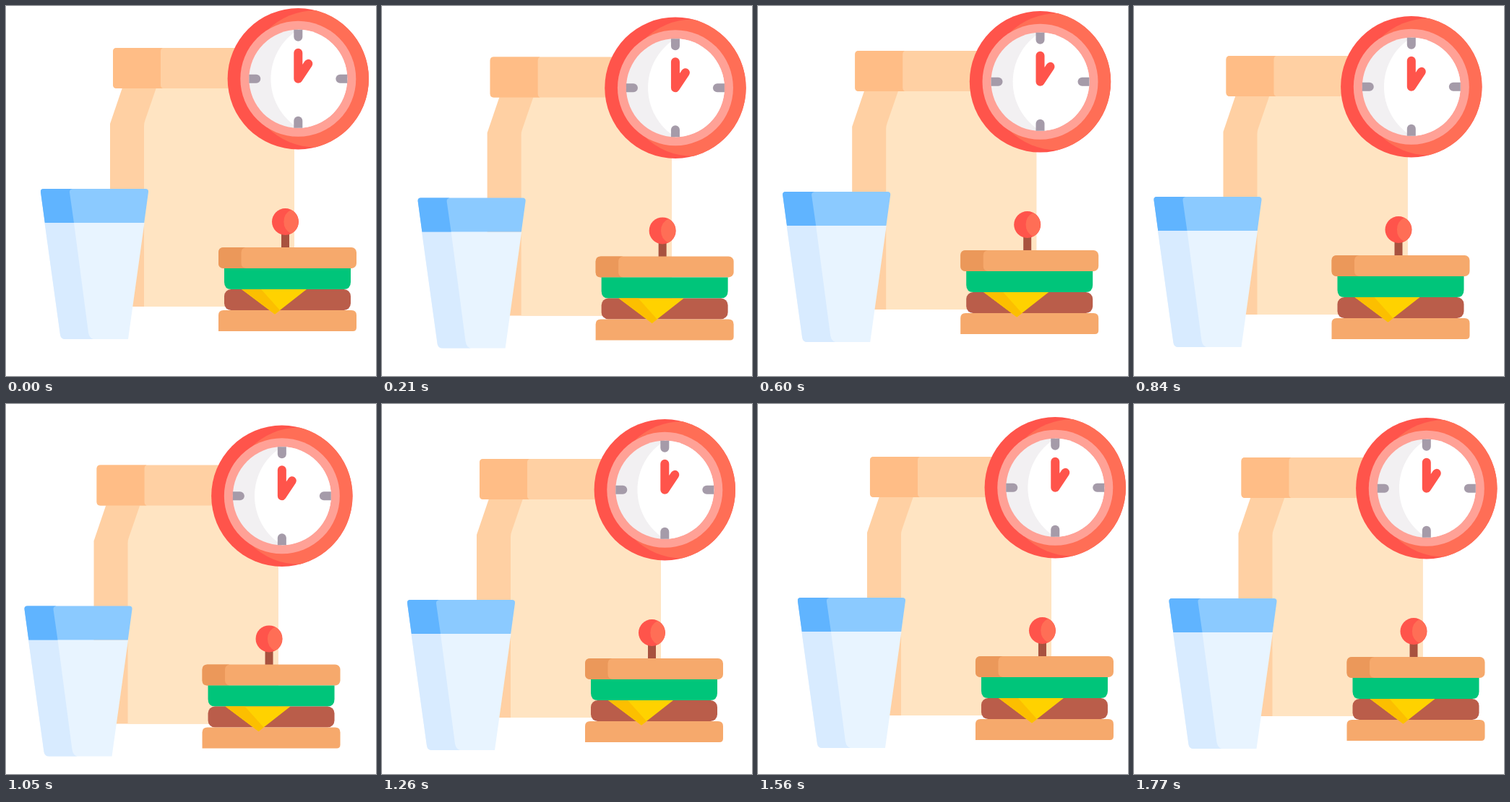
An HTML page that plays this animation: 512x512 px, repeating every 1.8 s.

```html
<!DOCTYPE html>
<html lang="en">
<head>
<meta charset="utf-8">
<title>Lunch time</title>
<style>
  html, body { margin: 0; width: 100%; height: 100%; overflow: hidden; background: #fff; }
  svg { display: block; width: 100%; height: 100%; }
</style>
</head>
<body>
<svg viewBox="0 0 512 512">
  <defs><path id="tick" d="M-6-68H6v10a6 6 0 0 1-12 0z" fill="#a59ba9"/></defs>
  <g id="scene">
    <!-- paper bag -->
    <path d="M161 113H380L399 163V416H144V163z" fill="#ffd0a3"/>
    <path d="M208 113H380L399 163V416H191V166Q191 162 192.500 158z" fill="#ffe4c2"/>
    <rect x="148" y="58" width="240" height="56" rx="5" fill="#ffd0a3"/>
    <path d="M153 58H217Q214 59 214 63V109Q214 113 217 114H153Q148 114 148 109V63Q148 58 153 58z" fill="#ffbd86"/>

    <!-- glass -->
    <path d="M53.500 300H191.500L169 461H82Q76 461 75 455z" fill="#e8f4ff"/>
    <path d="M53.500 300H94L114 452Q115.500 460 121 461H82Q76 461 75 455z" fill="#d8ebff"/>
    <path d="M52 253H193Q197.500 253 197 257.500L191.200 300H53.800L48 257.500Q47.500 253 52 253z" fill="#8bcaff"/>
    <path d="M52 253H92Q87.500 254 88 258L94 300H53.800L48 257.500Q47.500 253 52 253z" fill="#60b4ff"/>

    <!-- sandwich -->
    <rect x="381" y="312" width="11" height="24" fill="#a8523f"/>
    <circle cx="386.500" cy="298.500" r="18.500" fill="#ff544b"/>
    <path d="M394.500 282A18.500 18.500 0 0 1 394.500 315A18.500 18.500 0 0 1 394.500 282z" fill="#ff6e56"/>
    <rect x="294" y="334" width="191" height="29" rx="7" fill="#f6a96c"/>
    <path d="M301 334H332Q325.500 335 325.500 341V356Q325.500 362 332 363H301Q294 363 294 356V341Q294 334 301 334z" fill="#eb985a"/>
    <path d="M302 363H477V382Q477 392 467 392H312Q302 392 302 382z" fill="#00c57a"/>
    <rect x="302" y="392" width="175" height="29" rx="9.500" fill="#ba5d4a"/>
    <path d="M301 421H478Q485 421 485 428V445Q485 450 480 450H294V428Q294 421 301 421z" fill="#f6a96c"/>
    <path d="M326 392H416L372 426.500z" fill="#ffd200"/>
    <path d="M326 392H353L379 421L372 426.500z" fill="#fcbf00"/>

    <!-- clock -->
    <g transform="translate(404.300 100.800)">
      <circle r="97.700" fill="#ff544b"/>
      <path d="M24-94.700A97.700 97.700 0 0 1 24 94.700A94.700 94.700 0 0 1 24-94.700z" fill="#ff6e56"/>
      <circle r="80" fill="#ffa196"/>
      <circle r="68" fill="#f2f0f2"/>
      <path d="M0-68A68 68 0 0 1 0 68A80 80 0 0 1 0-68z" fill="#fff"/>
      <use href="#tick"/>
      <use href="#tick" transform="rotate(90)"/>
      <use href="#tick" transform="rotate(180)"/>
      <use href="#tick" transform="rotate(270)"/>
      <path d="M0-36V0L14-21" fill="none" stroke="#ff544b" stroke-width="12" stroke-linecap="round" stroke-linejoin="round"/>
    </g>
  </g>
</svg>
<script>
const LOOP = 1800, STEP = 30;

// Drift of the whole scene: [time in ms, offset]
const driftX = [[0, 0], [120, 4], [390, -7.5], [540, -11.2], [600, -13.8], [840, -20.5],
  [980, -23], [1080, -22], [1260, -13], [1570, 7], [1620, 6], [1770, 0.5]];
const driftY = [[0, 0], [310, 15], [390, 13.5], [590, 4], [840, 11], [1080, 27],
  [1260, 18], [1420, 12], [1560, 15], [1660, 18], [1770, 16]];

// Monotone cubic curve: it turns only at the given peaks
function curve(keys) {
  const slope = i => (keys[i + 1][1] - keys[i][1]) / (keys[i + 1][0] - keys[i][0]);
  const last = keys.length - 1;
  const tangent = i => {
    if (i === 0) return slope(0);
    if (i === last) return slope(last - 1);
    const a = slope(i - 1), b = slope(i);
    return a * b > 0 ? 2 * a * b / (a + b) : 0;
  };
  return t => {
    let i = 0;
    while (i < last - 1 && t > keys[i + 1][0]) i++;
    const [t0, p] = keys[i], [t1, q] = keys[i + 1];
    const d = t1 - t0, u = (t - t0) / d, v = 1 - u;
    return p * (1 + 2 * u) * v * v + q * (3 - 2 * u) * u * u
      + d * u * v * (tangent(i) * v - tangent(i + 1) * u);
  };
}

const x = curve(driftX), y = curve(driftY);
const scene = document.getElementById('scene');
const start = performance.now();

function draw(now) {
  const t = Math.floor(Math.max(0, now - start) % LOOP / STEP) * STEP;
  scene.setAttribute('transform', `translate(${x(t)} ${y(t)})`);
  requestAnimationFrame(draw);
}
draw(start);
</script>
</body>
</html>
```
